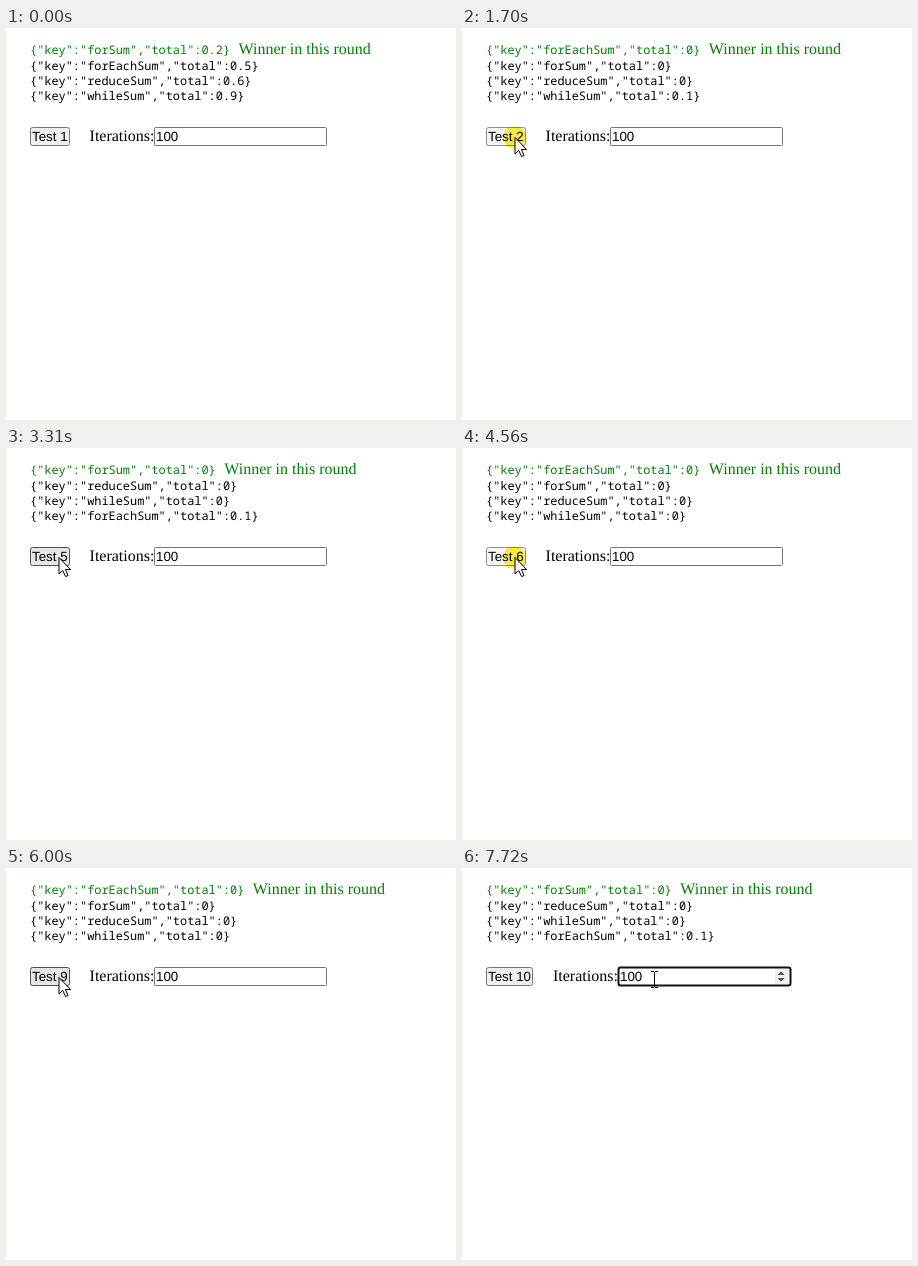
Write an HTML page with a canvas that moves like this. It is 450 px wide and 392 px high and loops after 8000 ms.

```html
<!DOCTYPE html>
<html lang="en">
<head>
<meta charset="utf-8">
<style>
html, body { margin: 0; width: 100%; height: 100%; overflow: hidden; background: #fff; }
canvas { display: block; }
</style>
</head>
<body>
<canvas id="stage" width="450" height="392"></canvas>
<script>
const ctx = document.getElementById('stage').getContext('2d');
const LOOP = 8000;
const MONO = '11.91px "Noto Sans Mono", monospace';
const SERIF = '16px "Liberation Serif", serif';
const SANS = '13.333px "Liberation Sans", sans-serif';
const LEFT = 24;
const TOP = 99;
const HEIGHT = 19;
const BASELINE = 113;
const INPUT_WIDTH = 173;

// Each round: press time, result time, ranking.
const rounds = [
  [-1, 0, 'forSum:0.2 forEachSum:0.5 reduceSum:0.6 whileSum:0.9'],
  [800, 930, 'forEachSum:0 forSum:0 reduceSum:0 whileSum:0.1'],
  [1700, 1820, 'forEachSum:0 forSum:0 whileSum:0 reduceSum:0.1'],
  [2440, 2600, 'forEachSum:0 forSum:0 reduceSum:0 whileSum:0'],
  [3180, 3310, 'forSum:0 reduceSum:0 whileSum:0 forEachSum:0.1'],
  [3890, 4050, 'forEachSum:0 forSum:0 reduceSum:0 whileSum:0'],
  [4560, 4690, 'forEachSum:0 forSum:0 whileSum:0 reduceSum:0.1'],
  [5200, 5360, 'reduceSum:0 whileSum:0 forEachSum:0.1 forSum:0.1'],
  [5840, 6000, 'forEachSum:0 forSum:0 reduceSum:0 whileSum:0'],
  [6530, 6680, 'forSum:0 reduceSum:0 whileSum:0 forEachSum:0.1']
];
const focus = { start: 7220, release: 7290, blink: 500 };
const moves = [
  { start: 140, end: 770, from: [395, 348], to: [52.5, 109] },
  { start: 6750, end: 7190, from: [52.5, 109], to: [192, 111] }
];

function text(string, x, y, font, color = '#000') {
  ctx.font = font;
  ctx.fillStyle = color;
  ctx.fillText(string, x, y);
  return ctx.measureText(string).width;
}

function box(x, y, w, h, fill, stroke, line = 1, radius = 2) {
  ctx.beginPath();
  ctx.roundRect(x + line / 2, y + line / 2, w - line, h - line, radius);
  ctx.fillStyle = fill;
  ctx.fill();
  ctx.strokeStyle = stroke;
  ctx.lineWidth = line;
  ctx.stroke();
}

function polygon(points, fill) {
  ctx.beginPath();
  points.forEach(([x, y]) => ctx.lineTo(x, y));
  ctx.closePath();
  ctx.fillStyle = fill;
  ctx.fill();
}

function pointerAt(t) {
  if (t < moves[0].start) return null;
  const move = t < moves[1].start ? moves[0] : moves[1];
  const p = Math.min(1, (t - move.start) / (move.end - move.start));
  const eased = p * p * (3 - 2 * p);
  return move.from.map((v, i) => v + (move.to[i] - v) * eased);
}

function drawResults(ranking) {
  ranking.split(' ').forEach((entry, i) => {
    const [key, total] = entry.split(':');
    const line = `{"key":"${key}","total":${total}}`;
    const y = i ? 26.5 + i * 15.2 : 26;
    const width = text(line, LEFT, Math.round(y), MONO, i ? '#000' : '#008000');
    if (!i) text('Winner in this round', LEFT + width + 8.5, 26, SERIF, '#008000');
  });
}

function drawButton(label, width, hovered, pressed) {
  const fill = pressed ? '#f5f5f5' : hovered ? '#e5e5e5' : '#efefef';
  const border = pressed ? '#8d8d8d' : hovered ? '#4f4f4f' : '#767676';
  box(LEFT, TOP, width, HEIGHT, fill, border);
  text(label, LEFT + 2, BASELINE, SANS);
}

function drawInput(x, hovered, t) {
  const focused = t >= focus.start;
  if (focused) box(x - 0.5, TOP - 0.5, INPUT_WIDTH + 1, HEIGHT + 1, '#fff', '#101010', 2);
  else box(x, TOP, INPUT_WIDTH, HEIGHT, '#fff', hovered ? '#4f4f4f' : '#767676', 1, 1);
  text('100', x + 2, BASELINE, SANS);
  if (hovered || focused) drawSpinner(x + INPUT_WIDTH - 10);
  if (focused && t < focus.start + focus.blink) {
    ctx.fillStyle = '#000';
    ctx.fillRect(x + 24, 101, 1, 15);
  }
}

function drawSpinner(x) {
  ctx.fillStyle = '#efefef';
  ctx.fillRect(x - 6, 101, 13, 15);
  for (const dir of [-1, 1]) {
    const y = 108.5 + dir * 1.5;
    polygon([[x - 3.5, y], [x + 3.5, y], [x, y + dir * 3.5]], '#505050');
  }
}

function drawArrow(x, y) {
  const shape = [[0, 0], [0, 16.5], [3.8, 13], [6.5, 19], [9, 18], [6.4, 12], [11.6, 12]];
  polygon(shape.map(([dx, dy]) => [x + dx + 0.5, y + dy + 0.5]), '#fff');
  ctx.strokeStyle = '#000';
  ctx.lineWidth = 1;
  ctx.stroke();
}

function drawBeam(x, y) {
  x = Math.round(x);
  y = Math.round(y);
  ctx.fillStyle = '#000';
  ctx.fillRect(x, y - 7, 1, 15);
  for (const edge of [y - 8, y + 8]) {
    ctx.fillRect(x - 3, edge, 3, 1);
    ctx.fillRect(x + 1, edge, 3, 1);
  }
}

function drawGlow(x, y) {
  ctx.save();
  ctx.globalCompositeOperation = 'multiply';
  ctx.fillStyle = 'rgba(255, 240, 0, 0.72)';
  ctx.beginPath();
  ctx.arc(x, y, 11.3, 0, Math.PI * 2);
  ctx.fill();
  ctx.restore();
}

function draw(t) {
  ctx.fillStyle = '#fff';
  ctx.fillRect(0, 0, 450, 392);
  ctx.textRendering = 'geometricPrecision';

  const count = rounds.filter(([, shown]) => t >= shown).length;
  const label = 'Test ' + count;
  const pressed = rounds.some(([down, shown]) => t >= down && t < shown);
  const clicking = pressed || (t >= focus.start && t < focus.release);

  ctx.font = SANS;
  const labelWidth = ctx.measureText(label).width + 4;
  const buttonWidth = Math.round(labelWidth);
  const labelX = LEFT + labelWidth + 20;
  ctx.font = SERIF;
  const inputX = Math.round(labelX + ctx.measureText('Iterations:').width);

  const pointer = pointerAt(t);
  const within = (x, w) => !!pointer && pointer[0] >= x && pointer[0] < x + w
    && pointer[1] >= TOP && pointer[1] < TOP + HEIGHT;
  const overInput = within(inputX, INPUT_WIDTH);
  const overLabel = within(labelX, inputX - labelX);

  drawResults(rounds[count - 1][2]);
  drawButton(label, buttonWidth, within(LEFT, buttonWidth), pressed);
  text('Iterations:', labelX, BASELINE, SERIF);
  drawInput(inputX, overInput, t);

  if (!pointer) return;
  if (clicking) drawGlow(pointer[0], pointer[1] + 0.5);
  (overInput || overLabel ? drawBeam : drawArrow)(...pointer);
}

const origin = performance.now();
function tick() {
  draw((performance.now() - origin) % LOOP);
  requestAnimationFrame(tick);
}
tick();
</script>
</body>
</html>
```
